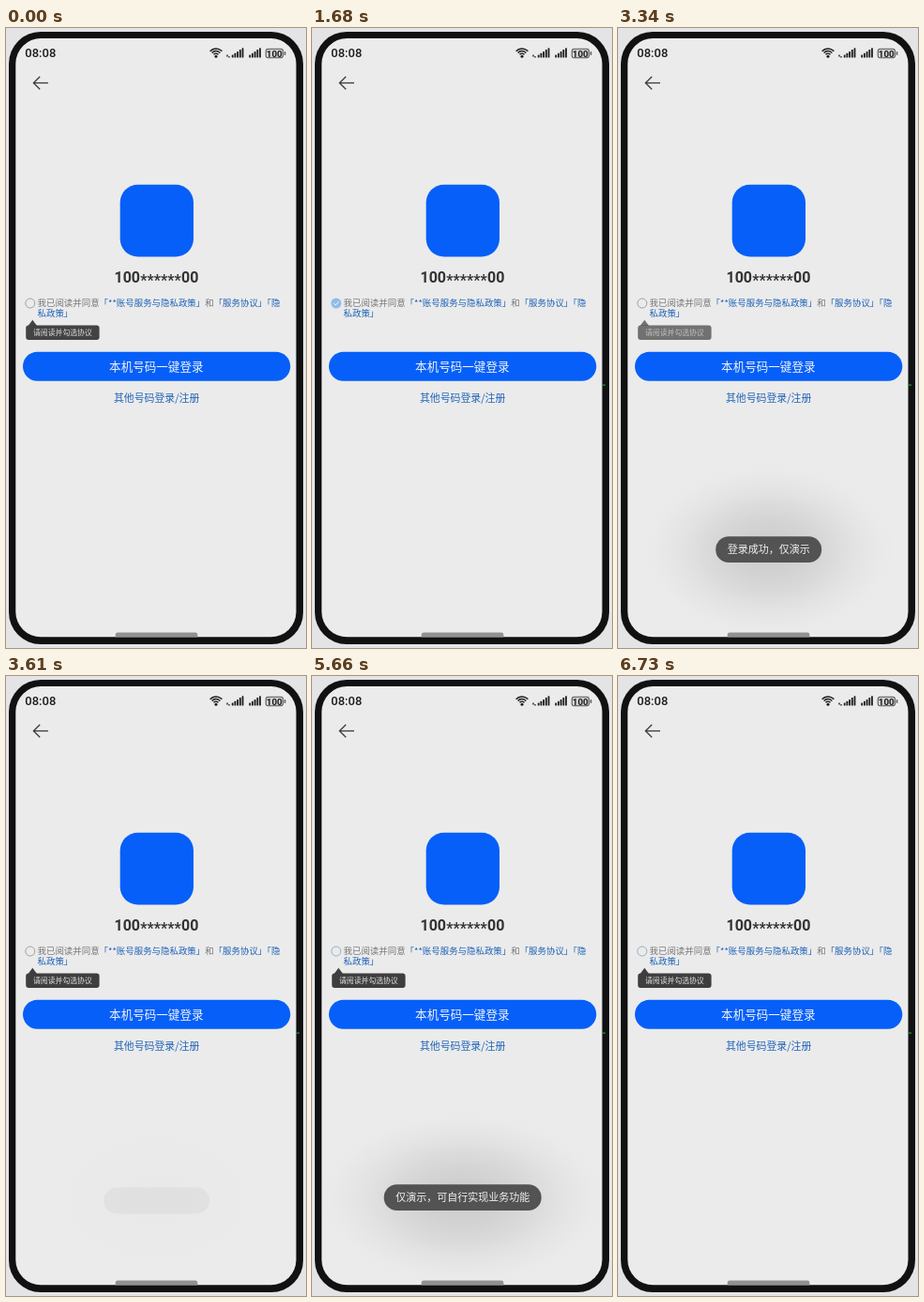
An HTML page with a canvas for the animation above (7.52 s loop, 320x660 px).

```html
<!DOCTYPE html>
<html lang="zh-CN">
<head>
<meta charset="utf-8">
<title>一键登录</title>
<style>
html, body { margin: 0; width: 100%; height: 100%; overflow: hidden; background: #e4e4e6; }
canvas { display: block; width: 320px; height: 660px; }
</style>
</head>
<body>
<canvas id="stage"></canvas>
<script>
const LOOP = 7520;
const CJK = '"Noto Sans CJK SC", "Noto Sans CJK", sans-serif';
const LATIN = 'Roboto, sans-serif';
const BLUE = '#055ff8', LINK = '#1f63b8', SCREEN = '#ebebeb', INK = '#1c1c1c';

const canvas = document.getElementById('stage');
const ctx = canvas.getContext('2d');
const ratio = window.devicePixelRatio || 1;
canvas.width = 320 * ratio;
canvas.height = 660 * ratio;
ctx.scale(ratio, ratio);

// Hard-stepped tracks: [time, value], each value held until the next time.
const tooltipTrack = [[0, 0.97], [70, 0.98], [140, 0.99], [210, 1], [880, 0], [3340, 0.7], [3470, 1]];
const toasts = [
  { text: '登录成功，仅演示', width: 113, glow: 142,
    track: [[0, 0], [1810, 0.85], [1880, 0.95], [1950, 1], [3610, 0.06], [3750, 0]] },
  { text: '仅演示，可自行实现业务功能', width: 168, glow: 162,
    track: [[0, 0], [4800, 0.85], [4870, 0.95], [4940, 1], [6590, 0.06], [6730, 0]] }
];

const valueAt = (track, t) => track.reduce((value, [time, next]) => t >= time ? next : value, 0);

function box(x, y, w, h, r, color) {
  ctx.beginPath();
  ctx.roundRect(x, y, w, h, r);
  ctx.fillStyle = color;
  ctx.fill();
}

function line(points, width, color) {
  ctx.beginPath();
  points.forEach(([x, y]) => ctx.lineTo(x, y));
  ctx.lineWidth = width;
  ctx.strokeStyle = color;
  ctx.stroke();
}

function text(str, x, y, font, color, align = 'left') {
  ctx.font = font;
  ctx.fillStyle = color;
  ctx.textAlign = align;
  ctx.fillText(str, x, y);
  return x + ctx.measureText(str).width;
}

function signal(x) {
  for (let i = 0; i < 5; i++) {
    const h = 3 + i * 1.8;
    box(x + i * 2.7, 31.5 - h, 1.8, h, 0.5, INK);
  }
}

function wifi(x, y) {
  ctx.strokeStyle = INK;
  ctx.lineWidth = 1.5;
  for (const r of [3.4, 6, 8.7]) {
    ctx.beginPath();
    ctx.arc(x, y, r, -Math.PI * 0.76, -Math.PI * 0.24);
    ctx.stroke();
  }
  ctx.beginPath();
  ctx.arc(x, y - 0.4, 1.5, 0, 7);
  ctx.fillStyle = INK;
  ctx.fill();
}

function statusBar() {
  text('08:08', 20.3, 31.2, `500 13px ${LATIN}`, INK);
  wifi(224, 30.6);
  box(235, 28.5, 2, 2, 0.5, '#555');
  box(237, 30, 2, 1.5, 0.5, '#555');
  signal(240.8);
  signal(259.3);
  box(276.7, 21.8, 19.3, 10.4, 3, '#555');
  box(277.7, 22.8, 17.3, 8.4, 2, '#d3d3d3');
  box(296.8, 25, 1.5, 4, 0.7, '#555');
  text('100', 286.3, 30.6, `bold 9.8px ${LATIN}`, INK, 'center');
}

function phone() {
  ctx.fillStyle = '#e4e4e6';
  ctx.fillRect(0, 0, 320, 660);
  box(3, 4, 314, 652, 34, '#111');
  box(10.3, 11, 299.2, 637.3, 27, SCREEN);
}

function page() {
  statusBar();
  line([[36.2, 51.8], [29.4, 58.5], [36.2, 65.2]], 1.3, '#3b3b3b');
  line([[29.4, 58.5], [45, 58.5]], 1.3, '#3b3b3b');

  box(121.7, 166.8, 78.3, 76.7, 19, BLUE);

  const bold = `bold 16px ${LATIN}`;
  text('100', 115.5, 271, bold, '#333');
  text('******', 143.2, 273.5, bold, '#333');
  text('00', 187, 271, bold, '#333');

  const small = `9.45px ${CJK}`;
  let x = text('我已阅读并同意', 33.5, 296.3, small, '#777');
  x = text('「**账号服务与隐私政策」', x, 296.3, small, LINK);
  x = text('和', x, 296.3, small, '#777');
  text('「服务协议」「隐', x, 296.3, small, LINK);
  text('私政策」', 33.5, 307.2, small, LINK);

  box(18, 344.8, 285.3, 31, 15.5, BLUE);
  text('本机号码一键登录', 160.3, 364.7, `500 12.55px ${CJK}`, '#f2f5fc', 'center');
  text('其他号码登录/注册', 160.6, 398.4, `10.9px ${CJK}`, LINK, 'center');
}

function checkbox(checked, ringColor) {
  ctx.beginPath();
  ctx.arc(25.8, 293, checked ? 5.5 : 5, 0, 7);
  if (checked) {
    ctx.fillStyle = '#92bce8';
    ctx.fill();
    line([[23.2, 293], [25.2, 295], [28.6, 291.3]], 1, '#f4f8fc');
  } else {
    ctx.lineWidth = 0.9;
    ctx.strokeStyle = ringColor;
    ctx.stroke();
  }
}

function tooltip(alpha) {
  if (!alpha) return;
  ctx.globalAlpha = alpha;
  ctx.beginPath();
  ctx.moveTo(28.3, 310.8);
  ctx.lineTo(33, 317);
  ctx.lineTo(23.6, 317);
  ctx.fillStyle = '#3e3e3e';
  ctx.fill();
  box(21.2, 316.6, 78.4, 15.3, 3, '#3e3e3e');
  text('请阅读并勾选协议', 60.4, 327.2, `7.87px ${CJK}`, '#e2e2e2', 'center');
  ctx.globalAlpha = 1;
}

function glow(rx, alpha) {
  const ry = 98;
  const shade = ctx.createRadialGradient(0, 0, 0, 0, 0, 1);
  for (let i = 0; i <= 8; i++) {
    const fall = (1 + Math.cos(Math.PI * i / 8)) / 2;
    shade.addColorStop(i / 8, `rgba(0,0,0,${0.13 * alpha * fall})`);
  }
  ctx.save();
  ctx.beginPath();
  ctx.roundRect(10.3, 11, 299.2, 637.3, 27);
  ctx.clip();
  ctx.translate(160.7, 556);
  ctx.scale(rx, ry);
  ctx.fillStyle = shade;
  ctx.fillRect(-1, -1, 2, 2);
  ctx.restore();
}

function toast({ text: label, width, glow: reach, track }, t) {
  const alpha = valueAt(track, t);
  if (!alpha) return;
  const drop = 3.5 * (1 - alpha);
  glow(reach, alpha);
  ctx.globalAlpha = alpha;
  box(160.7 - width / 2, 541.3 + drop, width, 27.8, 13.9, '#535353');
  text(label, 160.7, 559.2 + drop, `11px ${CJK}`, '#f0f0f0', 'center');
  ctx.globalAlpha = 1;
}

function draw(t) {
  phone();
  page();
  checkbox(t >= 880 && t < 3340, t < 3750 ? '#999' : '#8fa6c2');
  tooltip(valueAt(tooltipTrack, t));
  toasts.forEach(item => toast(item, t));
  box(116.7, 643.6, 87.7, 4.8, [2.4, 2.4, 0, 0], '#919191');
  if (t >= 1680) box(309.5, 379.5, 3.5, 1.2, 0, '#2a9a38');
}

const start = performance.now();
function tick() {
  draw((performance.now() - start) % LOOP);
  requestAnimationFrame(tick);
}
tick();
</script>
</body>
</html>
```
